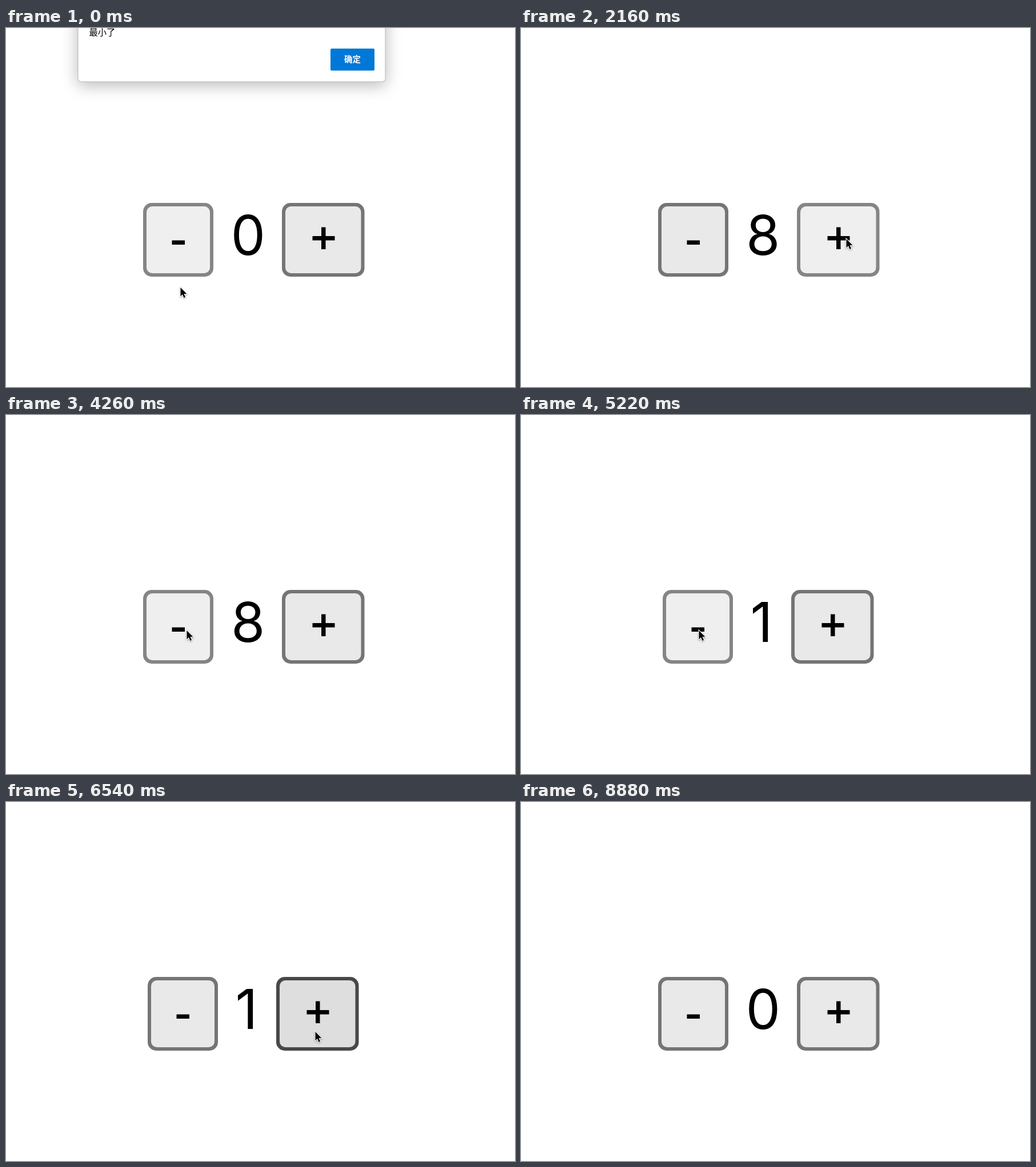
Animation, 891 px wide and 628 px high, one loop 9.06 s. Source, as an HTML page with a canvas:

```html
<!DOCTYPE html>
<html lang="zh">
<head>
<meta charset="utf-8">
<style>
  html, body { margin: 0; width: 100%; height: 100%; overflow: hidden; background: #fff; }
  canvas { display: block; }
</style>
</head>
<body>
<canvas id="stage" width="891" height="628"></canvas>
<script>
const ctx = document.getElementById('stage').getContext('2d');
const LOOP = 9060, TICK = 60, PRESS = 60, ALERT_TIME = 840;
const TOP = 306, HEIGHT = 129, MINUS_WIDTH = 123, PLUS_WIDTH = 144.5;
const CJK = '"Noto Sans CJK SC", "Noto Sans CJK", sans-serif';
const ARROW = new Path2D('M.5 1V16.2L4 12.9L6.5 18.9L9 17.8L6.5 12.1H11.4Z');

// Evenly paced clicks on one button; a click beyond the limit opens an alert.
const runs = [
  { start: -540, step: 90, count: 0, dir: -1, alert: '最小了' },
  { start: 1500, step: 90, count: 10, dir: 1, alert: '最大了' },
  { start: 4033, step: 137, count: 10, dir: -1 },
  { start: 6300, step: 300, count: 1, dir: 1 },
  { start: 7140, step: 300, count: 1, dir: -1, alert: '最小了' }
];
// Pointer moves; sag bends the way downwards.
const home = { x: 305, y: 453 };
const moves = [
  { from: 0, to: 1080, x: 569, y: 368, sag: 60 },
  { from: 3300, to: 3960, x: 316, y: 376, sag: 0 },
  { from: 4260, to: 5220, x: 311, y: 376, sag: 0 },
  { from: 5400, to: 6540, x: 541, y: 401, sag: 0 },
  { from: 6540, to: 7080, x: 308, y: 416, sag: 0 },
  { from: 8000, to: 8880, x: 40, y: 650, sag: 0 }
];
const looks = {
  normal: { border: '#757575', fill: '#e9e9e9' },
  hover: { border: '#484848', fill: '#dedede' },
  active: { border: '#858585', fill: '#efefef' }
};

const clamp = (v, lo, hi) => Math.min(hi, Math.max(lo, v));
const ease = k => k * k * (3 - 2 * k);

function counterAt(t) {
  return runs.reduce((sum, r) =>
    sum + r.dir * clamp(Math.floor((t - r.start) / r.step) + 1, 0, r.count), 0);
}

function pressedAt(t) {
  const run = runs.find(r => {
    const next = Math.max(0, Math.floor((t - r.start) / r.step) + 1);
    return next < r.count && r.start + next * r.step - t <= PRESS;
  });
  return run ? run.dir : 0;
}

function alertAt(t) {
  return runs.find(r => {
    const age = t - r.start - r.step * r.count;
    return r.alert && age >= 0 && age < ALERT_TIME;
  });
}

function pointerAt(t) {
  let { x, y } = home;
  for (const m of moves) {
    const k = ease(clamp((t - m.from) / (m.to - m.from), 0, 1));
    x += (m.x - x) * k;
    y += (m.y - y) * k + m.sag * Math.sin(Math.PI * k);
  }
  return { x, y };
}

function roundRect(x, y, w, h, r, color) {
  ctx.fillStyle = color;
  ctx.beginPath();
  ctx.roundRect(x, y, w, h, r);
  ctx.fill();
}

function bar(x, y, w, h) {
  ctx.fillStyle = '#000';
  ctx.fillRect(x, y, w, h);
}

function label(text, x, y, font, color) {
  ctx.font = font;
  ctx.fillStyle = color;
  ctx.fillText(text, x, y);
}

// Centres the visible part of a digit on x.
function digit(char, x) {
  const font = '400 96px Inter, "Noto Sans", sans-serif';
  ctx.font = font;
  const box = ctx.measureText(char);
  label(char, x + (box.actualBoundingBoxLeft - box.actualBoundingBoxRight) / 2, 396.5, font, '#000');
}

function button(x, w, { border, fill }) {
  roundRect(x, TOP, w, HEIGHT, 15, border);
  roundRect(x + 6, TOP + 6, w - 12, HEIGHT - 12, 10, fill);
}

function drawAlert(text) {
  ctx.save();
  ctx.shadowColor = 'rgba(0,0,0,.28)';
  ctx.shadowBlur = 28;
  ctx.shadowOffsetY = 6;
  roundRect(125.5, -80, 539, 174.5, 6, '#b8b8b8');
  ctx.restore();
  roundRect(126.5, -80, 537, 173.5, 5, '#fff');
  label(text, 145.5, 12.7, '400 15.3px ' + CJK, '#000');
  roundRect(568, 36, 77, 38.5, 2, '#0078d7');
  label('确定', 592, 59.8, '700 14.5px ' + CJK, '#fff');
}

function drawPointer({ x, y }) {
  ctx.save();
  ctx.translate(x, y);
  ctx.lineWidth = 2;
  ctx.strokeStyle = '#fff';
  ctx.shadowColor = 'rgba(0,0,0,.4)';
  ctx.shadowBlur = 3;
  ctx.shadowOffsetY = 1;
  ctx.stroke(ARROW);
  ctx.shadowColor = 'transparent';
  ctx.fillStyle = '#000';
  ctx.fill(ARROW);
  ctx.restore();
}

function draw(t) {
  const digits = [...String(counterAt(t))];
  const cell = char => char === '1' ? 39 : 57;
  const width = digits.reduce((sum, char) => sum + cell(char), 0);
  const minusX = Math.round(263.2 - width * .4);
  const plusX = minusX + 186 + width;
  const alertNow = alertAt(t);
  const active = alertNow ? alertNow.dir : pressedAt(t);
  const pointer = pointerAt(t);
  const look = (dir, x, w) => {
    if (active === dir) return looks.active;
    const inside = pointer.x >= x && pointer.x < x + w && pointer.y >= TOP && pointer.y < TOP + HEIGHT;
    return inside && !alertNow ? looks.hover : looks.normal;
  };

  ctx.fillStyle = '#fff';
  ctx.fillRect(0, 0, 891, 628);

  button(minusX, MINUS_WIDTH, look(-1, minusX, MINUS_WIDTH));
  bar(minusX + 50.5, 371.5, 22.5, 7.5);

  button(plusX, PLUS_WIDTH, look(1, plusX, PLUS_WIDTH));
  bar(plusX + 53.5, 364, 39, 7.5);
  bar(plusX + 69, 348.5, 7.5, 38.5);

  let x = minusX + 155;
  for (const char of digits) {
    digit(char, x + cell(char) / 2 - (char === '1' ? 3.5 : 0));
    x += cell(char);
  }

  if (alertNow) drawAlert(alertNow.alert);
  drawPointer(pointer);
}

function frame() {
  const t = performance.now() % LOOP;
  draw(Math.floor(t / TICK) * TICK);
  requestAnimationFrame(frame);
}
frame();
</script>
</body>
</html>
```
